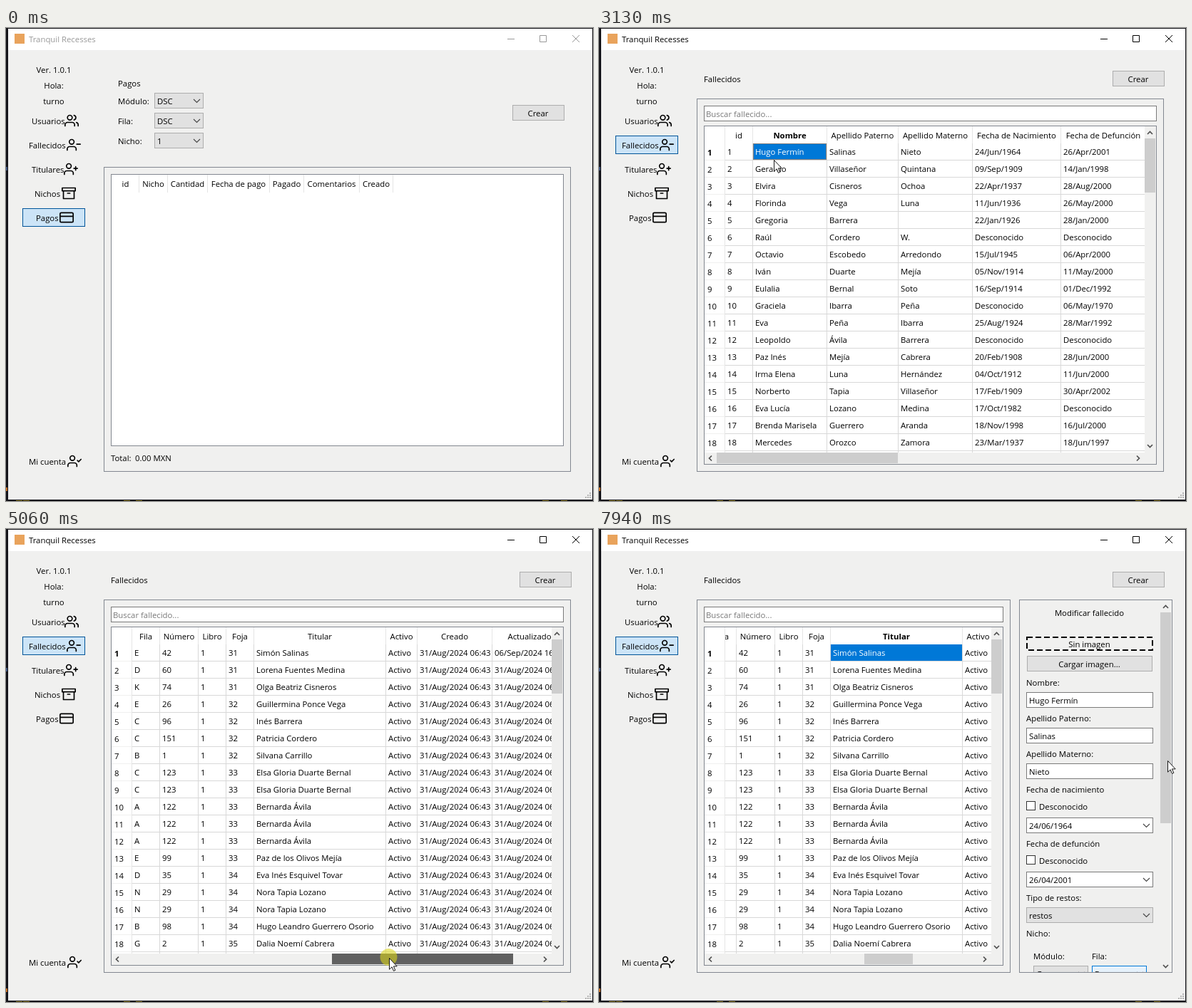
These frames come from a looping animation (823x664 px, 8 s). An HTML page:

```html
<!DOCTYPE html>
<html lang="es">
<head>
<meta charset="utf-8">
<title>Tranquil Recesses</title>
<style>
html, body { margin: 0; width: 100%; height: 100%; overflow: hidden; background: #15151a; }
svg { display: block; width: 823px; height: 664px; }
text { font: 11.35px "Open Sans", "Noto Sans", sans-serif; white-space: pre; }
.bold { font-weight: 700; }
.icon { fill: none; stroke: #000; stroke-width: 2; stroke-linecap: round; stroke-linejoin: round; }
</style>
</head>
<body>
<script>
const LOOP = 8000;
const FRAME = '#828790', GRID = '#d8d8d8', HEAD = '#e5e5e5', BODY = '#f0f0ef', THUMB = '#cdcdcd';

function el(parent, tag, attrs = {}, content) {
  const node = document.createElementNS('http://www.w3.org/2000/svg', tag);
  for (const k in attrs) node.setAttribute(k, attrs[k]);
  if (content !== undefined) node.textContent = content;
  parent.appendChild(node);
  return node;
}
const group = (p, attrs) => el(p, 'g', attrs);
const fill = (p, x, y, width, height, color) => el(p, 'rect', { x, y, width, height, fill: color });
// Outlined box given by its outer pixel corners.
const box = (p, x1, y1, x2, y2, color, stroke) => el(p, 'rect', {
  x: x1 + .5, y: y1 + .5, width: x2 - x1, height: y2 - y1, fill: color, stroke });
const text = (p, x, y, s, color = '#000') => el(p, 'text', { x, y, fill: color }, s);
function centered(p, x, y, s) {
  const node = text(p, x, y, s);
  node.setAttribute('text-anchor', 'middle');
  return node;
}
const path = (p, d, stroke, width = 1) => el(p, 'path', { d, stroke, fill: 'none', 'stroke-width': width });
const show = (node, on) => node.setAttribute('visibility', on ? 'inherit' : 'hidden');
const move = (node, x, y = 0) => node.setAttribute('transform', `translate(${x} ${y})`);

function button(p, x1, y1, x2, y2, label) {
  box(p, x1, y1, x2, y2, '#e1e1e1', '#adadad');
  centered(p, (x1 + x2) / 2, y1 + 16, label);
}
function combo(p, x1, y1, x2, label, color = '#e1e1e1', stroke = '#adadad') {
  box(p, x1, y1, x2, y1 + 21, color, stroke);
  text(p, x1 + 4, y1 + 16, label);
  path(p, `M${x2 - 13} ${y1 + 9}l4.5 4.5 4.5-4.5`, '#444', 1.1);
}
// Small scrollbar arrow; turn 0 points up.
const arrow = (p, x, y, turn) => el(p, 'path', {
  d: 'M-3.5 2L0-1.5 3.5 2', fill: 'none', stroke: '#505050', 'stroke-width': 1.7,
  transform: `translate(${x} ${y}) rotate(${turn})` });

const svg = el(document.body, 'svg', { viewBox: '0 0 823 664', width: 823, height: 664 });
const defs = el(svg, 'defs');
function clip(id, x, y, width, height) {
  return el(el(defs, 'clipPath', { id }), 'rect', { x, y, width, height });
}

// Window
fill(svg, 0, 0, 823, 664, '#15151a');
fill(svg, 0, 195, 2, 5, '#39507c');
fill(svg, 0, 645, 2, 5, '#c46a1c');
[14, 24, 165, 182, 752, 778].forEach(x => fill(svg, x, 663, 9, 1, '#8a7a2a'));
fill(svg, 3, 1, 819, 30, '#fff');
fill(svg, 3, 31, 819, 631, BODY);
fill(svg, 12, 8, 14, 14, '#e9a35c');
const title = text(svg, 32, 20, 'Tranquil Recesses');
const controls = path(svg, 'M703 15.5h10M748.5 10.5h9v9h-9zM794 10l10 10M804 10l-10 10', '#000');
for (let r = 0; r < 3; r++)
  for (let c = 0; c <= r; c++) fill(svg, 818 - c * 3, 652 + r * 3, 2, 2, '#b5b5b5');

// Sidebar
['Ver. 1.0.1', 'Hola:', 'turno'].forEach((s, i) => centered(svg, 67, 63 + 22 * i, s));
const navBox = box(svg, 23, 253, 110, 278, '#cce4f7', '#005499');
const PERSON = 'M16 21v-2a4 4 0 0 0-4-4H5a4 4 0 0 0-4 4v2M4.5 7a4 4 0 1 0 8 0a4 4 0 1 0-8 0';
[
  ['Usuarios', 36, 82, 130, 'M17 21v-2a4 4 0 0 0-4-4H5a4 4 0 0 0-4 4v2M5 7a4 4 0 1 0 8 0a4 4 0 1 0-8 0M23 21v-2a4 4 0 0 0-3-3.9M16 3.1a4 4 0 0 1 0 7.8'],
  ['Fallecidos', 32, 85, 164, PERSON + 'M23 11h-6'],
  ['Titulares', 36, 81, 198, PERSON + 'M20 8v6M23 11h-6'],
  ['Nichos', 40, 78, 232, 'M21 8v13H3V8M1 3h22v5H1zM10 12h4'],
  ['Pagos', 42, 75, 266, 'M3 4h18a2 2 0 0 1 2 2v12a2 2 0 0 1-2 2H3a2 2 0 0 1-2-2V6a2 2 0 0 1 2-2zM1 10h22'],
  ['Mi cuenta', 32, 86, 608, PERSON + 'M17 11l2 2 4-4'],
].forEach(([label, x, iconX, y, d]) => {
  text(svg, x, y + 5, label);
  el(svg, 'path', { d, class: 'icon', transform: `translate(${iconX} ${y - 10}) scale(.8333)` });
});

// Payments page
const payments = group(svg);
text(payments, 157, 82, 'Pagos');
[['Módulo:', 'DSC'], ['Fila:', 'DSC'], ['Nicho:', '1']].forEach(([label, value], i) => {
  text(payments, 157, 107 + 28 * i, label);
  combo(payments, 208, 91 + 28 * i, 276, value);
});
button(payments, 710, 108, 782, 129, 'Crear');
box(payments, 137, 195, 791, 622, 'none', FRAME);
box(payments, 147, 205, 781, 586, '#fff', FRAME);
let edge = 148;
[['id', 186], ['Nicho', 226], ['Cantidad', 282], ['Fecha de pago', 369], ['Pagado', 417],
 ['Comentarios', 495], ['Creado', 542]].forEach(([s, end]) => {
  centered(payments, (edge + end) / 2 + .5, 223, s);
  fill(payments, end, 206, 1, 25, HEAD);
  edge = end;
});
text(payments, 147, 608, 'Total:');
text(payments, 181, 608, '0.00 MXN');

// Records page
const COLS = [['id', 39], ['Nombre', 104], ['Apellido Paterno', 100], ['Apellido Materno', 104],
  ['Fecha de Nacimiento', 124], ['Fecha de Defunción', 119], ['Tipo de restos', 86], ['Módulo', 50],
  ['Fila', 39], ['Número', 54], ['Libro', 39], ['Foja', 39], ['Titular', 185], ['Activo', 44],
  ['Creado', 105], ['Actualizado', 105]];
const ROWS = `Hugo Fermín|Salinas|Nieto|24/Jun/1964|26/Apr/2001|restos|G|E|42|31|Simón Salinas
Gerardo|Villaseñor|Quintana|09/Sep/1909|14/Jan/1998|restos|G|D|60|31|Lorena Fuentes Medina
Elvira|Cisneros|Ochoa|22/Apr/1937|28/Aug/2000|restos|D|K|74|31|Olga Beatriz Cisneros
Florinda|Vega|Luna|11/Jun/1936|26/May/2000|restos|G|E|26|32|Guillermina Ponce Vega
Gregoria|Barrera||22/Jan/1926|28/Jan/2000|restos|D|C|96|32|Inés Barrera
Raúl|Cordero|W.|||restos|C|C|151|32|Patricia Cordero
Octavio|Escobedo|Arredondo|15/Jul/1945|06/Apr/2000|restos|F|B|1|32|Silvana Carrillo
Iván|Duarte|Mejía|05/Nov/1914|11/May/2000|cenizas|C|C|123|33|Elsa Gloria Duarte Bernal
Eulalia|Bernal|Soto|16/Sep/1914|01/Dec/1992|cenizas|C|C|123|33|Elsa Gloria Duarte Bernal
Graciela|Ibarra|Peña||06/May/1970|cenizas|A|A|122|33|Bernarda Ávila
Eva|Peña|Ibarra|25/Aug/1924|28/Mar/1992|cenizas|A|A|122|33|Bernarda Ávila
Leopoldo|Ávila|Barrera|||cenizas|A|A|122|33|Bernarda Ávila
Paz Inés|Mejía|Cabrera|20/Feb/1908|28/Jun/2000|restos|D|E|99|33|Paz de los Olivos Mejía
Irma Elena|Luna|Hernández|04/Oct/1912|11/Jun/2000|restos|G|D|35|34|Eva Inés Esquivel Tovar
Norberto|Tapia|Villaseñor|17/Feb/1909|30/Apr/2002|cenizas|D|N|29|34|Nora Tapia Lozano
Eva Lucía|Lozano|Medina|17/Oct/1982||cenizas|D|N|29|34|Nora Tapia Lozano
Brenda Marisela|Guerrero|Aranda|18/Nov/1998|16/Jul/2000|restos|D|B|98|34|Hugo Leandro Guerrero Osorio
Mercedes|Orozco|Zamora|23/Mar/1937|18/Jun/1997|cenizas|G|G|2|35|Dalia Noemí Cabrera`
  .split('\n').map((line, i) => {
    const v = line.split('|'), made = '31/Aug/2024 06:43';
    return [i + 1, ...v.slice(0, 3), v[3] || 'Desconocido', v[4] || 'Desconocido', ...v.slice(5, 9),
      '1', v[9], v[10], 'Activo', made, i ? made : '06/Sep/2024 16:37'];
  });

const records = group(svg);
text(records, 147, 76, 'Fallecidos');
button(records, 720, 60, 792, 81, 'Crear');
const stretchy = [
  [box(records, 137, 99, 791, 622, 'none', FRAME), 654, 439],
  [box(records, 147, 109, 781, 130, '#fff', '#7a7a7a'), 634, 419],
  [box(records, 147, 137, 781, 612, '#fff', FRAME), 634, 419],
  [clip('cells', 177, 138, 588, 458), 588, 373],
];
text(records, 150, 125, 'Buscar fallecido...', '#787878');

const sheet = group(group(records, { 'clip-path': 'url(#cells)' }));
const starts = [], heads = [], firstRow = [];
let left = 176;
const selection = group(sheet);
const selected = fill(selection, 0, 162, 0, 23, '#0078d7');
const focusRing = el(selection, 'rect', { y: 162.5, height: 22, fill: 'none', stroke: '#ff8728', 'stroke-dasharray': '1 1' });
COLS.forEach(([name, width], c) => {
  starts.push(left);
  heads.push(centered(sheet, left + width / 2 + .5, 155, name));
  ROWS.forEach((row, r) => {
    const cell = text(sheet, left + 4, 178 + 24 * r, row[c]);
    if (!r) firstRow.push(cell);
  });
  left += width;
  fill(sheet, left, 138, 1, 24, HEAD);
  fill(sheet, left, 162, 1, 434, GRID);
});
let rowHead;
ROWS.forEach((row, r) => {
  fill(sheet, 176, 185 + 24 * r, left - 176, 1, GRID);
  fill(records, 148, 185 + 24 * r, 28, 1, BODY);
  const n = text(records, 152, 179 + 24 * r, r + 1);
  rowHead = rowHead || n;
});
fill(records, 176, 138, 1, 458, HEAD);

const track = fill(records, 148, 596, 633, 16, BODY);
stretchy.push([track, 633, 418]);
arrow(records, 156, 604, -90);
const thumb = fill(records, 165, 596, 254, 15, THUMB);
const side = group(records);
fill(side, 765, 138, 16, 458, BODY);
fill(side, 765, 155, 15, 76, THUMB);
arrow(side, 772.5, 147, 0);
arrow(side, 772.5, 587, 180);
arrow(side, 756, 604, 90);

// Edit panel
const panel = group(records);
box(panel, 589, 99, 803, 622, BODY, FRAME);
clip('form', 590, 100, 197, 522);
const form = group(panel, { 'clip-path': 'url(#form)' });
centered(form, 687.5, 122, 'Modificar fallecido');
el(form, 'rect', { x: 600, y: 152, width: 176, height: 18, fill: 'none', stroke: '#000', 'stroke-width': 2, 'stroke-dasharray': '8 4' });
centered(form, 687.5, 166, 'Sin imagen');
button(form, 600, 178, 775, 199, 'Cargar imagen...');
['Nombre:', 'Apellido Paterno:', 'Apellido Materno:'].forEach((label, i) => {
  const y = 220 + 50 * i;
  text(form, 599, y, label);
  box(form, 599, y + 9, 776, y + 30, '#fff', '#7a7a7a');
  text(form, 603, y + 25, ROWS[0][i + 1]);
});
[['Fecha de nacimiento', '24/06/1964'], ['Fecha de defunción', '26/04/2001']].forEach(([label, date], i) => {
  const y = 370 + 76 * i;
  text(form, 599, y, label);
  box(form, 599, y + 12, 611, y + 24, '#fff', '#333');
  text(form, 617, y + 24, 'Desconocido');
  combo(form, 599, y + 35, 776, date, '#fff', '#7a7a7a');
});
text(form, 599, 522, 'Tipo de restos:');
combo(form, 599, 531, 776, 'restos');
text(form, 599, 572, 'Nicho:');
text(form, 609, 604, 'Módulo:');
text(form, 691, 604, 'Fila:');
combo(form, 609, 613, 685, 'G');
combo(form, 691, 613, 767, 'E', '#e5f1fb', '#0078d7');
fill(panel, 787, 117, 15, 296, THUMB);
arrow(panel, 794.5, 109, 0);
arrow(panel, 794.5, 614, 180);

// Pointer
const ring = el(svg, 'circle', { r: 12, fill: 'rgb(218,214,25)', 'fill-opacity': .58 });
const pointer = el(svg, 'path', {
  d: 'M.5.5V16.2L4.1 12.8 6.5 18.4 8.8 17.4 6.4 11.9H11.2Z', fill: '#fff', stroke: '#000', 'stroke-width': .9 });

// [time, x, y, eased]
const KEYS = [
  [130, 618, 499], [760, 77, 159, 1], [1500, 77, 159], [1780, 207, 164], [2050, 242, 164],
  [2180, 242, 164], [2390, 247, 175], [3060, 247, 175], [3820, 184, 592, 1], [3880, 184, 592],
  [4160, 230, 604], [4300, 228, 605], [4650, 447, 605], [5060, 537, 602], [5200, 562, 603],
  [5360, 560, 604], [5550, 511, 206], [5830, 466, 186], [6020, 466, 186], [6160, 457, 175],
  [7170, 457, 175], [7450, 600, 430], [7660, 760, 616], [7940, 797, 325]];
const MOVES = [[130, 760], [1570, 2050], [2250, 2390], [3130, 3820], [3950, 4710], [4780, 5550],
  [5620, 5830], [6090, 6160], [7240, 7940]];
const CLICKS = [[960, 1100], [2860, 2930], [4300, 5410], [6290, 6560], [6630, 6700]];
const within = (t, [a, b]) => t >= a && t < b;

// The pointer advances in 70 ms steps and rests between moves.
function snap(t) {
  const [a, b] = MOVES.filter(m => m[0] <= t).pop() || MOVES[0];
  return Math.min(b, a + Math.floor((t - a + 12) / 70) * 70);
}
function pointerAt(t) {
  const i = KEYS.findIndex(k => k[0] >= t);
  if (i <= 0) return KEYS[0].slice(1, 3);
  const [t0, x0, y0] = KEYS[i - 1], [t1, x1, y1, eased] = KEYS[i];
  let u = (t - t0) / (t1 - t0);
  if (eased) u = u * u * (3 - 2 * u);
  return [Math.round(x0 + (x1 - x0) * u), Math.round(y0 + (y1 - y0) * u)];
}

function render(t) {
  const [x, y] = pointerAt(snap(t));
  const focused = t >= 960, opened = t >= 1170, editing = t >= 6970;
  const dragging = within(t, [4300, 5410]);
  const step = t < 4300 ? 0 : dragging ? Math.max(0, Math.min(9, Math.round((x - 228) / 36.5))) : 9;
  const picked = t < 2860 ? -1 : t < 6290 ? 1 : 12;

  title.setAttribute('fill', focused ? '#000' : '#999');
  controls.setAttribute('stroke', focused ? '#000' : '#999');
  navBox.setAttribute('y', opened ? 151.5 : 253.5);
  show(payments, !opened);
  show(records, opened);
  show(panel, opened && editing);

  stretchy.forEach(([node, wide, narrow]) => node.setAttribute('width', editing ? narrow : wide));
  move(side, editing ? -215 : 0);
  move(sheet, -(step === 9 ? 749 : starts[step] - 176));
  thumb.setAttribute('x', editing ? 372 : Math.floor(165 + 36.5 * step));
  thumb.setAttribute('width', editing ? 68 : 254);
  thumb.setAttribute('fill', dragging ? '#606060' : within(t, [4090, 4300]) ? '#a6a6a6' : THUMB);

  show(selection, opened && picked >= 0);
  show(focusRing, picked === 1);
  if (picked >= 0) {
    const x0 = starts[picked] + 1, width = COLS[picked][1] - 1;
    selected.setAttribute('x', x0);
    selected.setAttribute('width', width);
    focusRing.setAttribute('x', x0 + .5);
    focusRing.setAttribute('width', width - 1);
  }
  heads.forEach((h, c) => h.setAttribute('class', c === picked ? 'bold' : ''));
  firstRow.forEach((n, c) => n.setAttribute('fill', c === picked ? '#fff' : '#000'));
  rowHead.setAttribute('class', picked >= 0 ? 'bold' : '');

  show(pointer, t >= 130);
  move(pointer, x, y);
  show(ring, CLICKS.some(c => within(t, c)));
  move(ring, x - .5, y - 1);
}

const begin = performance.now();
function tick() {
  render((performance.now() - begin) % LOOP);
  requestAnimationFrame(tick);
}
tick();
</script>
</body>
</html>
```
